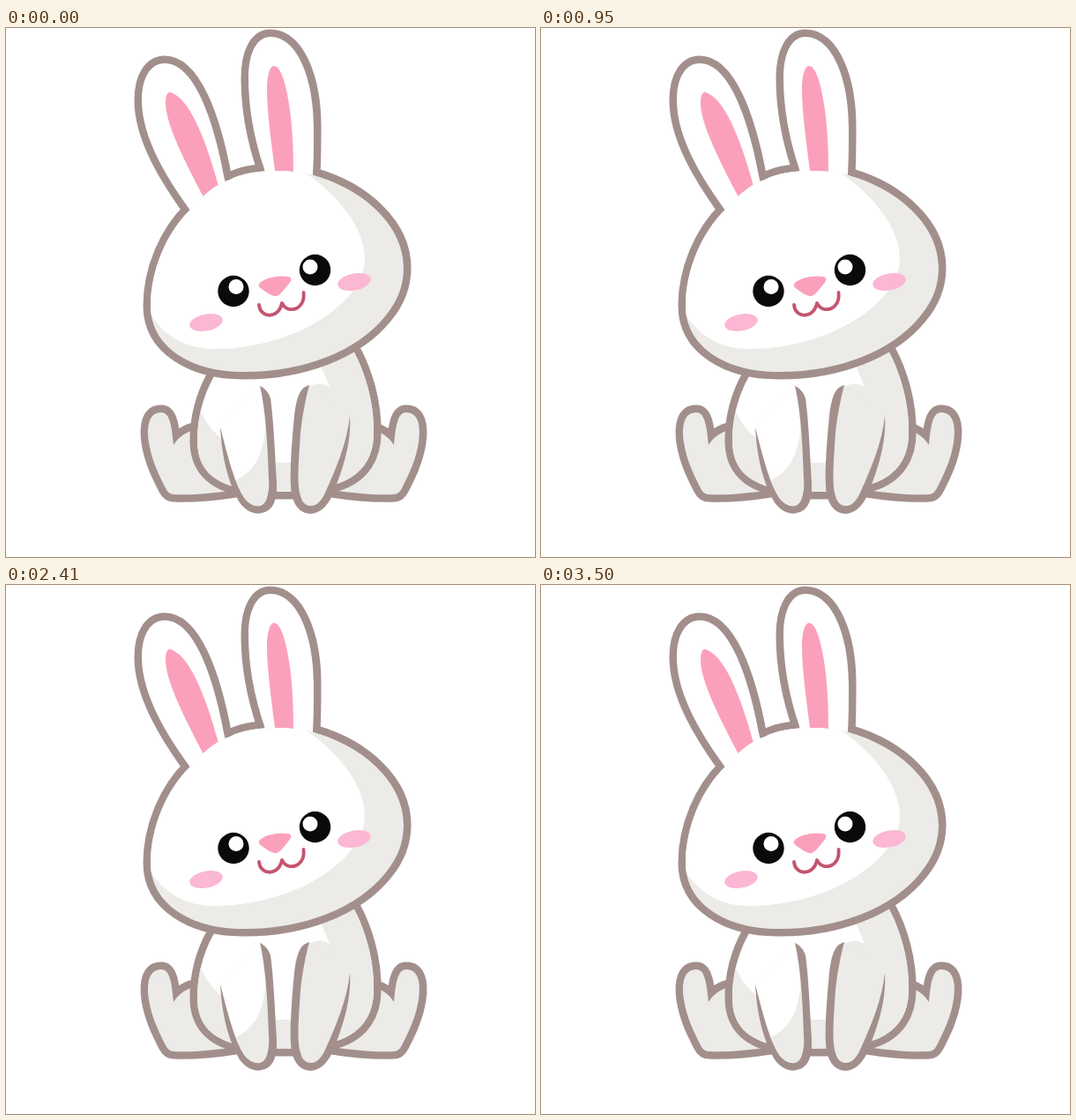
Recreate the animation shown at these times as an HTML page with a canvas. Size 600 by 600 pixels, loop 3550 ms.

```html
<!DOCTYPE html>
<html lang="en">
<head>
<meta charset="utf-8">
<title>Bunny</title>
<style>
html, body { margin: 0; width: 100%; height: 100%; overflow: hidden; background: #fff; }
canvas { display: block; width: 600px; height: 600px; }
</style>
</head>
<body>
<canvas id="stage" width="600" height="600"></canvas>
<script>
const ctx = document.getElementById('stage').getContext('2d');
const LOOP = 3550;
const LINE = '#a28f8b', GREY = '#ecebe7', WHITE = '#fff', PINK = '#fba0bb', BLUSH = '#fbb7d4';

// Each ear flap: start, length, swing in degrees, slide of the ear root.
const FLAPS = [
  { start: 17, length: 878, swing: 18.2, dx: 7, dy: 14 },
  { start: 2587, length: 694, swing: 24.8, dx: 2.7, dy: 7.6 }
];

const shape = d => new Path2D(d);
const leg = shape('M162 470C159 450 163 436 176 436C186 436 188 452 190 473C196 463 206 457 218 455L260 524C235 528 210 530 190 529C186 529 183 526 181 522C173 506 165 490 162 470Z');
const torso = shape('M236 395C222 420 217 445 217 468C217 500 235 515 265 522L300 526H335L375 517C405 508 417 485 417 460C418 425 407 390 394 366Z');
const torsoShade = shape('M357 383L367 407C358 402 349 402 342 410L334 540H430V360H360ZM216 422C223 444 234 458 247 468L258 530H205V422ZM300 493H336V535H300Z');

const leftArmInner = 'M243 453C250 480 258 512 268 530C275 541 283 543 288 542C297 540 299 525 298 512C297 480 295 435 288 406Z';
const leftArmOuter = 'M243 453C245 490 253 515 262 533C270 550 285 552 290 550C303 548 308 535 307 515C305 480 303 440 300 420C297 411 292 408 288 406Z';
const rightArmInner = 'M344 405C340 420 336 440 334 460C332 490 331 505 332 520C333 535 338 542 346 542C353 542 359 535 364 523C374 500 387 470 390 440Z';
const rightArmOuter = 'M344 405C334 408 330 416 327 440C324 470 322 500 323 520C324 540 333 551 346 551C358 550 367 540 373 523C382 500 392 470 390 440Z';
const leftArm = shape(leftArmInner), rightArm = shape(rightArmInner);
const armLines = [shape(leftArmInner + leftArmOuter), shape(rightArmInner + rightArmOuter)];
const leftArmLight = shape('M236 400H294V455C292 485 280 505 258 514H236Z');

const head = shape('M209 206C182 232 164 275 164 315C164 363 212 390 268 390C335 391 398 367 430 327C445 309 451 291 451 272C451 224 406 184 352 168C330 160 277 159 254 172C237 177 221 192 209 206Z');
const headLight = shape('M338 163C375 188 407 226 407 262C407 310 330 364 235 364C205 364 180 350 163 324L100 324V100H338Z');
const nose = shape('M288 289C294 283 310 280 320 282C325 283 324 287 320 291C316 296 311 303 307 304C302 305 296 300 290 296C286 293 286 291 288 289Z');
const mouth = shape('M287 314C288 329 309 331 313 312C319 325 340 320 337.5 300');

const leftEar = {
  outer: shape('M222 226L207 204C184 172 154 125 154 82C154 55 165 40 180 40C212 40 235 100 248 172L255 200Z'),
  inner: shape('M228 203L223 190C205 155 181 110 181 85C181 77 183 72 187 73C207 80 225 120 241 179L245 192Z')
};
const rightEar = {
  outer: shape('M296 190L293 160C281 125 275 90 275 57C275 27 285 10 300 10C330 10 349 57 349 112C349 135 349 150 348 165V190Z'),
  inner: shape('M307 175L305 162C301 130 296 95 296 70C296 55 299 43 304 43C317 43 327 105 326 162V175Z')
};

function fill(path, color, rule) {
  ctx.fillStyle = color;
  ctx.fill(path, rule || 'nonzero');
}

function outline(path) {
  ctx.strokeStyle = LINE;
  ctx.lineWidth = 17;
  ctx.lineJoin = 'round';
  ctx.stroke(path);
}

function fillInside(area, base, overlay, color) {
  fill(area, base);
  ctx.save();
  ctx.clip(area);
  fill(overlay, color);
  ctx.restore();
}

function ellipse(x, y, rx, ry, color, angle = 0) {
  ctx.fillStyle = color;
  ctx.beginPath();
  ctx.ellipse(x, y, rx, ry, angle, 0, Math.PI * 2);
  ctx.fill();
}

function posed(pose, draw) {
  ctx.save();
  ctx.translate(pose.x + (pose.dx || 0), pose.y + (pose.dy || 0));
  ctx.rotate(pose.deg * Math.PI / 180);
  ctx.translate(-pose.x, -pose.y);
  draw();
  ctx.restore();
}

function drawLeg() {
  outline(leg);
  fill(leg, GREY);
}

function drawBody() {
  drawLeg();
  ctx.save();
  ctx.translate(630, 0);
  ctx.scale(-1, 1);
  drawLeg();
  ctx.restore();

  outline(torso);
  fillInside(torso, WHITE, torsoShade, GREY);
  fillInside(leftArm, GREY, leftArmLight, WHITE);
  fill(rightArm, GREY);
  armLines.forEach(line => fill(line, LINE, 'evenodd'));
}

function drawFace() {
  ellipse(227, 334, 19, 9.5, BLUSH, -0.2);
  ellipse(395, 288, 19, 9.5, BLUSH, -0.2);
  for (const [x, y, glintX, glintY] of [[258, 298.5, 261, 293.5], [350.5, 274.5, 345, 271]]) {
    ellipse(x, y, 17.7, 17.7, '#0a090b');
    ellipse(glintX, glintY, 8.5, 8.5, WHITE);
  }
  fill(nose, PINK);
  ctx.strokeStyle = '#c4546f';
  ctx.lineWidth = 3.8;
  ctx.lineCap = 'round';
  ctx.stroke(mouth);
}

function drawHead(lift, flap) {
  const headPose = { x: 325, y: 165, deg: -lift };
  const ears = [
    [leftEar, { x: 231, y: 183, deg: -flap.swing * lift, dx: flap.dx * lift, dy: flap.dy * lift }],
    [rightEar, { x: 315, y: 161, deg: 0.7 * lift, dx: -3.2 * lift }]
  ];
  for (const [ear, pose] of ears) posed(pose, () => outline(ear.outer));
  posed(headPose, () => outline(head));
  for (const [ear, pose] of ears) {
    posed(pose, () => {
      fill(ear.outer, WHITE);
      fill(ear.inner, PINK);
    });
  }
  posed(headPose, () => {
    fillInside(head, GREY, headLight, WHITE);
    drawFace();
  });
}

function render(now) {
  const t = now % LOOP;
  const flap = FLAPS.find(f => t >= f.start && t <= f.start + f.length) || FLAPS[0];
  const progress = Math.min(1, Math.max(0, (t - flap.start) / flap.length));
  const lift = Math.sin(Math.PI * progress) ** 2;
  ctx.fillStyle = WHITE;
  ctx.fillRect(0, 0, 600, 600);
  drawBody();
  drawHead(lift, flap);
}

const begin = performance.now();
function tick() {
  render(performance.now() - begin);
  requestAnimationFrame(tick);
}
tick();
</script>
</body>
</html>
```
